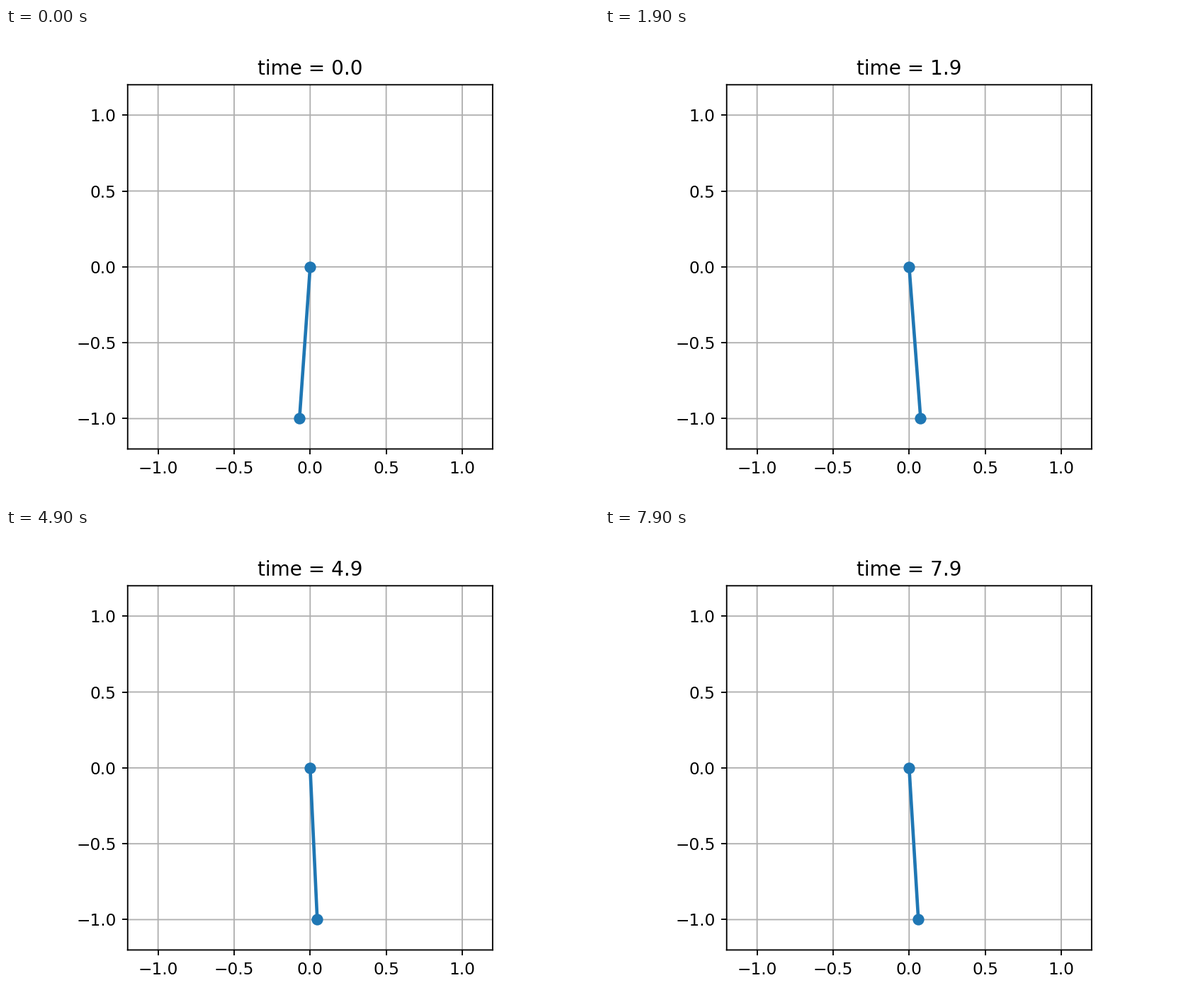
A matplotlib script that plays this animation: 837 by 669 pixels, repeating every 8 s.

```python
import numpy as np
import matplotlib.pyplot as plt
from matplotlib.animation import FuncAnimation

WIDTH, HEIGHT, DPI = 837, 669, 167.4
FRAMES, INTERVAL = 80, 100

# Turning points of the swing: time (s), angle from straight down (rad)
TURNS = [(-0.4, 0.942), (0.4, -1.082), (1.31, 0.622), (2.15, -0.064),
         (3.2, 0.147), (4.18, -0.096), (5.45, 0.14), (6.62, -0.078),
         (7.9, 0.0605)]


def angle(t):
    """Half a cosine wave from each turning point to the next."""
    for (t0, a0), (t1, a1) in zip(TURNS, TURNS[1:]):
        if t <= t1:
            break
    return a0 + (a1 - a0) * (1 - np.cos(np.pi * (t - t0) / (t1 - t0))) / 2


plt.rcParams["font.family"] = "DejaVu Sans"
plt.rcParams["path.snap"] = False
# The tiny margin guards against rounding the pixel size down
fig = plt.figure(figsize=((WIDTH + 1e-4) / DPI, (HEIGHT + 1e-4) / DPI), dpi=DPI)
fig.subplots_adjust(left=0.1254, right=0.9004)
ax = fig.add_subplot(xlim=(-1.2, 1.2), ylim=(-1.2, 1.2), aspect="equal")
ticks = np.arange(-1, 1.1, 0.5)
ax.set_xticks(ticks)
ax.set_yticks(ticks)
ax.grid()
rod, = ax.plot([], [], "o-", lw=2, color="tab:blue")
title = ax.set_title("")


def update(frame):
    t = frame * INTERVAL / 1000
    a = angle(t)
    rod.set_data([0, np.sin(a)], [0, -np.cos(a)])
    title.set_text(f"time = {t:.1f}")
    return rod, title


anim = FuncAnimation(fig, update, frames=FRAMES, interval=INTERVAL,
                     init_func=lambda: update(0), repeat=True, repeat_delay=0)
plt.show()
```
